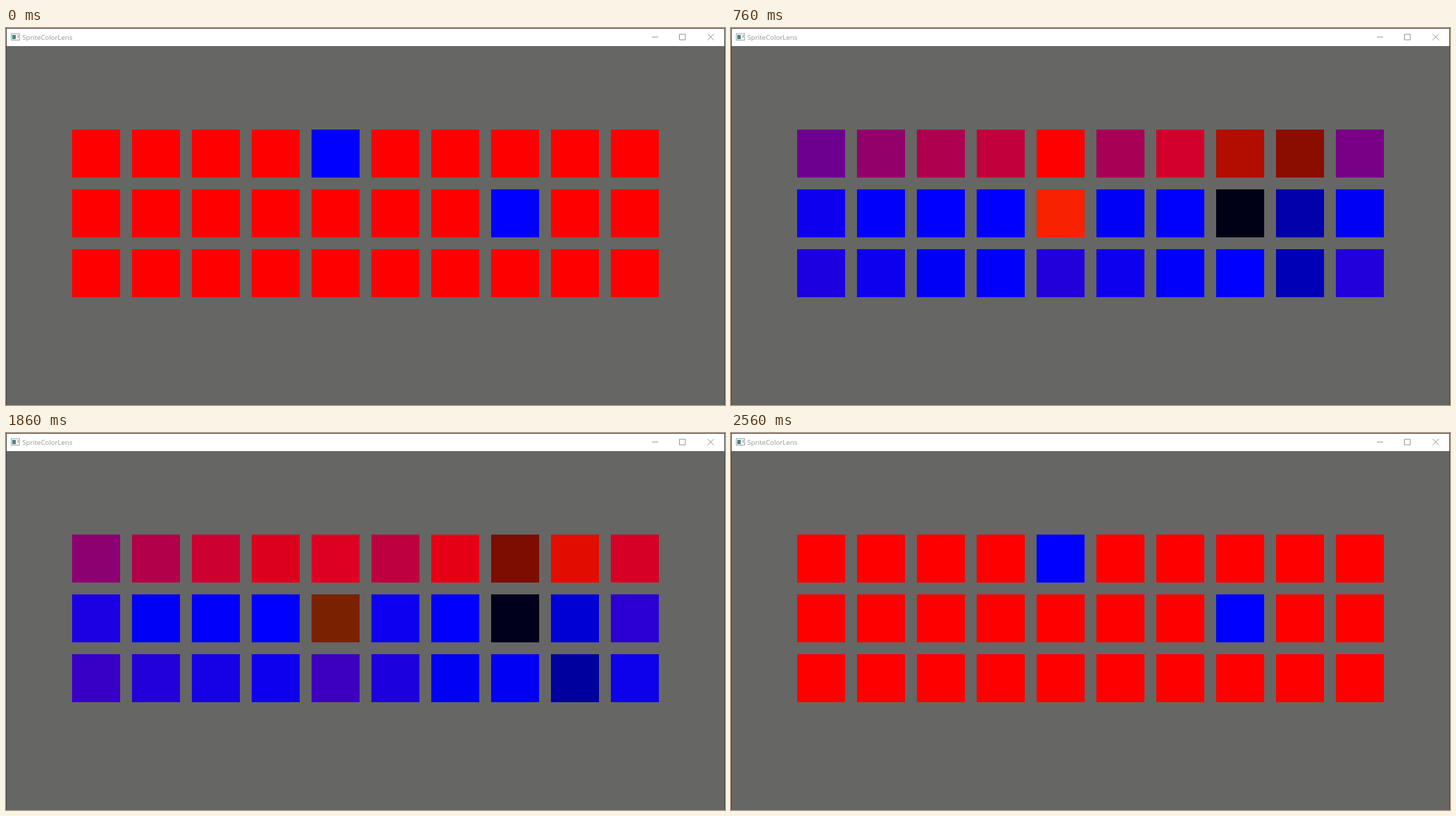
Recreate the animation shown at these times as an HTML page. Size 1033 px wide and 542 px high, loop 2880 ms.

```html
<!DOCTYPE html>
<html lang="en">
<head>
<meta charset="utf-8">
<title>SpriteColorLens</title>
<style>
  html, body { margin: 0; width: 100%; height: 100%; overflow: hidden; background: #666664; }
  svg { display: block; width: 100%; height: 100%; }
  text { font: 9.7px "Open Sans", "Noto Sans", sans-serif; fill: #96969a; }
</style>
</head>
<body>
<svg viewBox="0 0 1033 542">
  <rect width="1033" height="542" fill="#666664"/>
  <rect width="1033" height="26" fill="#fff"/>
  <path d="M0 .5H1033M.5 0V542M1032.5 0V542" stroke="#484848" fill="none"/>
  <rect x="7.5" y="8" width="12" height="9.5" fill="#f4f6f6" stroke="#a3a8a8"/>
  <rect x="9" y="10" width="5" height="6" fill="#4b8583"/>
  <path d="M17.5 10V14" stroke="#8a9292"/>
  <text x="23.5" y="17">SpriteColorLens</text>
  <path d="M928 13H937M967.5 9H976V17H967.5ZM1008 8.5L1017 17.5M1017 8.5L1008 17.5" stroke="#929292" fill="none"/>
  <g id="tiles" shape-rendering="crispEdges"></g>
</svg>
<script>
const { sin, cos, sqrt, PI, pow, min, max, round } = Math;
const TAU = 2 * PI;
const LOOP = 2880;

// Build the in / out / in-out trio from one "in" curve.
const trio = f => [
  f,
  p => 1 - f(1 - p),
  p => p < 0.5 ? f(2 * p) / 2 : 1 - f(2 - 2 * p) / 2
];

const bounceOut = p =>
  p < 4 / 11 ? 121 * p * p / 16 :
  p < 8 / 11 ? 363 / 40 * p * p - 9.9 * p + 3.4 :
  p < 0.9 ? 4356 / 361 * p * p - 35442 / 1805 * p + 16061 / 1805 :
  10.8 * p * p - 20.52 * p + 10.72;

// Sine and elastic run over a full turn, so they overshoot heavily.
const elasticIn = p => sin(13 * TAU * p) * pow(2, 10 * (p - 1));
const elasticOut = p => 1 - sin(13 * TAU * p) * pow(2, -10 * p);

const columns = [
  ...[2, 3, 4, 5].map(n => trio(p => pow(p, n))),
  [p => sin((p - 1) * TAU) + 1, p => sin(p * TAU), p => (1 - cos(p * PI)) / 2],
  trio(p => 1 - sqrt(1 - p * p)),
  trio(p => p === 0 ? 0 : pow(2, 10 * (p - 1))),
  [elasticIn, elasticOut,
    p => p < 0.5 ? elasticIn(2 * p) / 2 : (1 + elasticOut(2 * p - 1)) / 2],
  trio(p => p * p * p - p * sin(p * PI)),
  trio(p => 1 - bounceOut(1 - p))
];

const toLinear = v => v <= 0.04045 ? v / 12.92 : pow((v + 0.055) / 1.055, 2.4);
const toScreen = n => {
  const v = n / 255;
  return round(255 * (v <= 0.0031308 ? v * 12.92 : 1.055 * pow(v, 1 / 2.4) - 0.055));
};
const pack = v => Math.floor(max(0, toLinear(v)) * 255 + 1e-6);

// Packed channels wrap at 8 bits; red spills into green.
function mix(p) {
  const red = pack(1 - p), blue = pack(p);
  return `rgb(${[red & 255, red >> 8, blue & 255].map(toScreen)})`;
}

const group = document.getElementById("tiles");
const tiles = columns.flatMap((curves, col) => curves.map((ease, row) => {
  const el = document.createElementNS(group.namespaceURI, "rect");
  const box = { x: 95 + 86 * col, y: 146 + 86 * row, width: 69, height: 69 };
  for (const key in box) el.setAttribute(key, box[key]);
  group.append(el);
  return { el, ease };
}));

const there = [70, 150, 230, 300, 380, 460, 530, 610, 690, 760, 850, 930, 1010, 1080];
const back = [1560, 1630, 1710, 1790, 1860, 1940, 2020, 2100, 2170, 2250, 2330, 2400, 2480, 2560];
const passed = (times, ms) => times.filter(t => t <= ms).length;

// Progress advances in whole ticks of 1/60.
function progress(ms) {
  const b = passed(back, ms);
  if (b) return max(0, b === 14 ? 0 : round(59 - 4.75 * (b - 1))) / 60;
  const k = passed(there, ms);
  return k ? min(60, k === 14 ? 60 : round(4.6 * k - 1)) / 60 : 0;
}

let shown = -1;
function draw(ms) {
  const p = progress(ms);
  if (p === shown) return;
  shown = p;
  for (const { el, ease } of tiles) el.setAttribute("fill", mix(ease(p)));
}

function tick() {
  draw(performance.now() % LOOP);
  requestAnimationFrame(tick);
}
tick();
</script>
</body>
</html>
```
